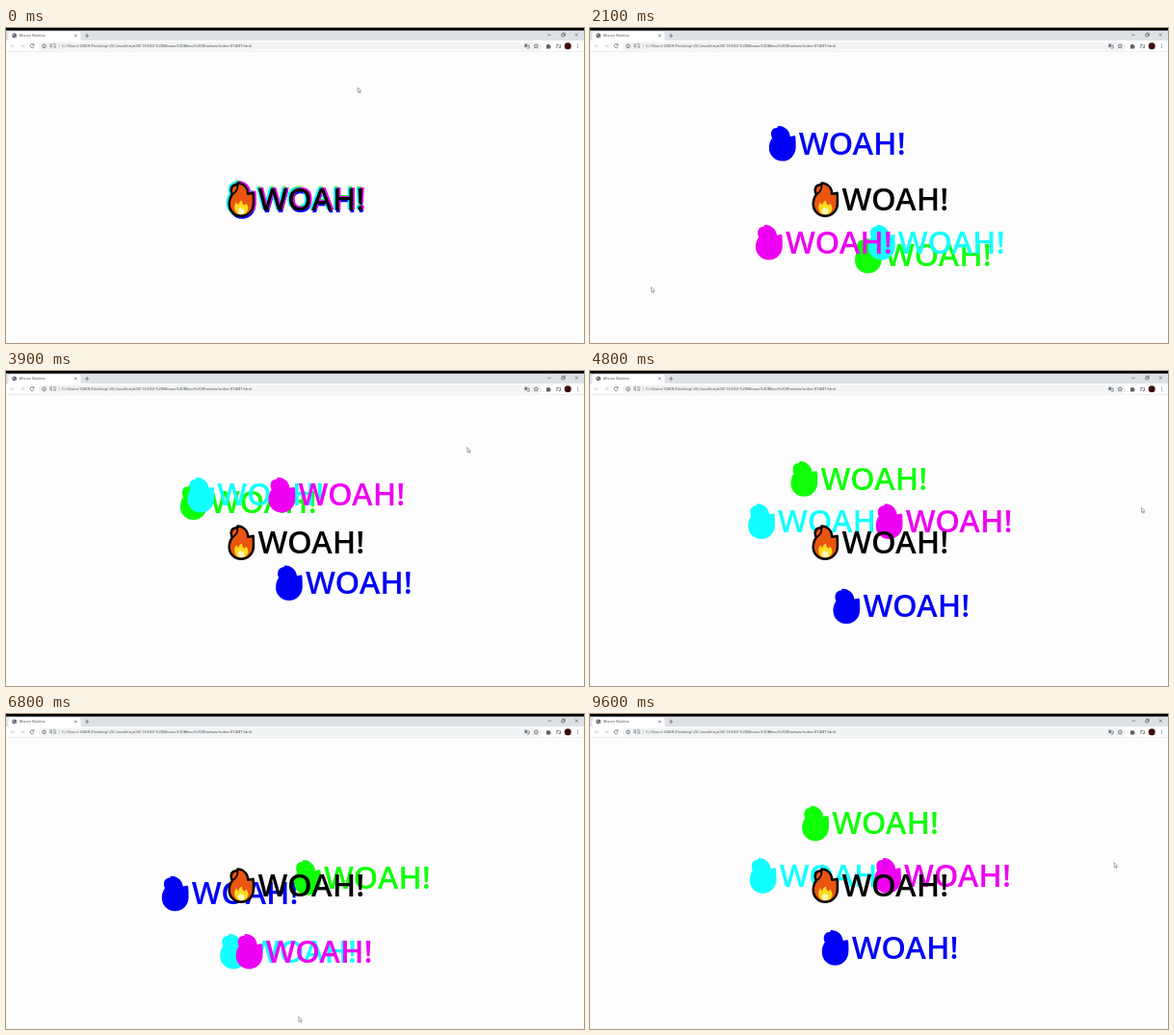
These frames come from a looping animation (600 px wide and 328 px high, 9.7 s). An HTML page:

```html
<!DOCTYPE html>
<html>
<head>
<meta charset="utf-8">
<title>Mouse Shadow</title>
<style>
  html, body { margin: 0; width: 100%; height: 100%; overflow: hidden; background: #fefdfe; }
  svg { display: block; width: 600px; height: 328px; }
  .ui { font-family: Roboto, "Noto Sans CJK KR", "Noto Sans CJK", sans-serif; fill: #5a5d61; }
  .line { fill: none; stroke: #5f6368; stroke-width: .7; }
  .pale { stroke: #c4c7ca; }
  .head { font: 600 32.7px "Open Sans", "Noto Sans", sans-serif; }
</style>
</head>
<body>
<svg viewBox="0 0 600 328">
  <defs>
    <path id="flame" stroke-linejoin="round" d="M240.4 161.6C246.6 162 251 166 251.2 172.8L256.6 171.8C257 176 257 179 256.9 183C256.7 190.5 251 195.7 244.2 195.7C237 195.7 231.7 190.3 231.7 183.2C231.7 179 232.8 176 235 173.2C232.8 170 233.4 165 236.8 163.8L240 163.3Z"/>
    <text id="word" class="head" x="261.4" y="190">WOAH!</text>
    <g id="woah">
      <use href="#flame" stroke="currentColor" stroke-width="2.5"/>
      <use href="#word"/>
    </g>
  </defs>

  <rect width="600" height="328" fill="#fefdfe"/>

  <!-- browser bar -->
  <rect width="600" height="14" fill="#dee1e6"/>
  <rect width="600" height="2.6"/>
  <rect y="13" width="600" height="11.5" fill="#fff"/>
  <path d="M1 13.5Q2.5 13.5 2.5 11.5V6Q2.5 3.8 4.5 3.8H75.5Q77.5 3.8 77.5 6V11.5Q77.5 13.5 79 13.5Z" fill="#fff"/>
  <circle cx="8.7" cy="8" r="2.4" fill="#5f6368"/>
  <path d="M7 7.2h2M8.6 9.2h1.5" stroke="#fff" stroke-width=".6"/>
  <text class="ui" x="14" y="9.4" font-size="3.9">Mouse Shadow</text>
  <path class="line" d="M71.1 6.6l2.6 2.6m0-2.6l-2.6 2.6M82 8h4.4m-2.2-2.2v4.4"/>
  <path class="line" d="M562.3 7.2h3.6M576.8 6.2h2.6v2.6h-2.6zM577.7 6v-.8h2.6v2.6h-.8M590.8 5.6l3 3m0-3l-3 3"/>

  <path class="line pale" d="M9 18.8H5.2m1.8-1.9l-1.9 1.9 1.9 1.9M15 18.8h3.8m-1.8-1.9l1.9 1.9-1.9 1.9"/>
  <path class="line" d="M28.8 17.6a2 2 0 1 0 .2 1.7M29 16.2v1.7h-1.7"/>
  <rect x="34" y="14.4" width="522" height="8.8" rx="4.4" fill="#f1f3f4"/>
  <circle class="line" cx="39.6" cy="18.8" r="1.9"/>
  <path class="line" d="M39.6 18.5v1.3m0-2.3v.5"/>
  <text class="ui" x="44.8" y="20.2" font-size="4.2">파일</text>
  <path class="line pale" d="M55.3 16.5v4.6"/>
  <text class="ui" x="58" y="20.2" font-size="4.38">C:/Users/USER/Desktop/JS/JavaScript30/16%20-%20Mouse%20Move%20Shadow/index-START.html</text>
  <rect x="538.3" y="16.6" width="2.8" height="3.4" fill="#777b80"/>
  <path class="line" d="M541.3 18h1.8v3h-2.6"/>
  <path class="line" d="M550.2 16.5l.7 1.6 1.7.1-1.3 1.1.4 1.7-1.5-.9-1.5.9.4-1.7-1.3-1.1 1.7-.1z"/>
  <path d="M561 17.6h1.2a.8.8 0 0 1 1.6 0h1.2v1.2a.8.8 0 0 1 0 1.6v1.1h-4z" fill="#5f6368"/>
  <path class="line" d="M571 17.3h3.6m-3.6 1.5h2.4m-2.4 1.5h1.6m3-3v3"/>
  <circle cx="574.9" cy="20.4" r=".8" fill="#5f6368"/>
  <circle cx="583.2" cy="18.7" r="3.5" fill="#3d0b0b"/>
  <path d="M593.4 16.6v.9m0 .8v.9m0 .8v.9" stroke="#5f6368" stroke-width=".9"/>
  <path d="M0 24.4H600" stroke="#dcdde0" stroke-width=".6"/>

  <!-- shadows, lowest first -->
  <g id="shadows">
    <use href="#woah" fill="#0000f6" color="#0000f6"/>
    <use href="#woah" fill="#10ff08" color="#10ff08"/>
    <use href="#woah" fill="#12ffff" color="#12ffff"/>
    <use href="#woah" fill="#ee00f2" color="#ee00f2"/>
  </g>

  <use href="#word"/>
  <use href="#flame" fill="#ea5510"/>
  <path d="M237.4 188.5C236.6 185 238 182.6 239.2 181.2C239.6 183 240.2 183.8 241.2 184C241.6 181.6 243 180 245 179.4C244.8 182 246 183.4 247.4 184.6C248.4 184.2 249 183.4 249.2 182.4C251.4 185 252 188 250.8 190.6C249.6 193.2 247 194.6 244 194.6C240.6 194.6 238 192 237.4 188.5Z" fill="#ffdc1e"/>
  <path d="M241 190.6C241 188.8 242 187.6 243.4 186.4C243.8 187.6 244.4 188.4 245.4 188.8L246.6 187.6C248 190 247.8 194.4 244.4 194.4C242.2 194.4 241 192.8 241 190.6Z" fill="#fff8c4"/>
  <path d="M240.4 162.8C241 167 239.6 170.5 235 173.2" fill="none" stroke="#000" stroke-width="1.7"/>
  <use href="#flame" fill="none" stroke="#000" stroke-width="2.5"/>

  <path id="cursor" d="M0 0V5.1L1.2 4.1L2 6L2.8 5.6L2 3.8H3.6Z" fill="#fff" stroke="#666" stroke-width=".55"/>
</svg>
<script>
const LOOP = 9700, STEP = 100;

// the hand circles clockwise around the heading: step, angle in degrees, radius
const orbit = [
  [0, -30, 2], [1, -74, 59], [4, 0, 72], [8, 145, 71], [12, 166, 20.6], [22, 142, 75],
  [29, 292.5, 38], [39, 310.3, 65], [58, 389, 72], [78, 512, 66], [96, 711, 65.5], [97, 710, 62]
];

const rise = (i, k) => (orbit[i + 1][k] - orbit[i][k]) / (orbit[i + 1][0] - orbit[i][0]);

// flat at turning points, so the curve never overshoots
function slope(i, k) {
  if (i === 0 || i === orbit.length - 1) return 0;
  const a = rise(i - 1, k), b = rise(i, k);
  return a * b > 0 ? 2 * a * b / (a + b) : 0;
}

// shadow offset at a step: cubic Hermite in polar form
function offset(s) {
  let i = 0;
  while (i < orbit.length - 2 && orbit[i + 1][0] <= s) i++;
  const a = orbit[i], b = orbit[i + 1], d = b[0] - a[0], u = (s - a[0]) / d, v = 1 - u;
  const [angle, r] = [1, 2].map(k =>
    a[k] * v * v * (1 + 2 * u) + b[k] * u * u * (3 - 2 * u) +
    d * u * v * (v * slope(i, k) - u * slope(i + 1, k)));
  const rad = angle * Math.PI / 180;
  return [r * Math.cos(rad), r * Math.sin(rad)];
}

const cursor = document.getElementById("cursor");
const [blue, green, cyan, magenta] = document.getElementById("shadows").children;
const move = (el, x, y) =>
  el.setAttribute("transform", `translate(${x.toFixed(2)} ${y.toFixed(2)})`);

function draw() {
  const s = Math.floor(performance.now() % LOOP / STEP);
  const [x, y] = offset(s);
  move(magenta, x, y);
  move(cyan, -x, y);
  move(green, y, -x);
  move(blue, -y, x);

  // the pointer runs one step ahead of its shadows
  const [px, py] = offset(s + 1);
  move(cursor, 300 + px / .25, 176.5 + py / .495);
  requestAnimationFrame(draw);
}
draw();
</script>
</body>
</html>
```
